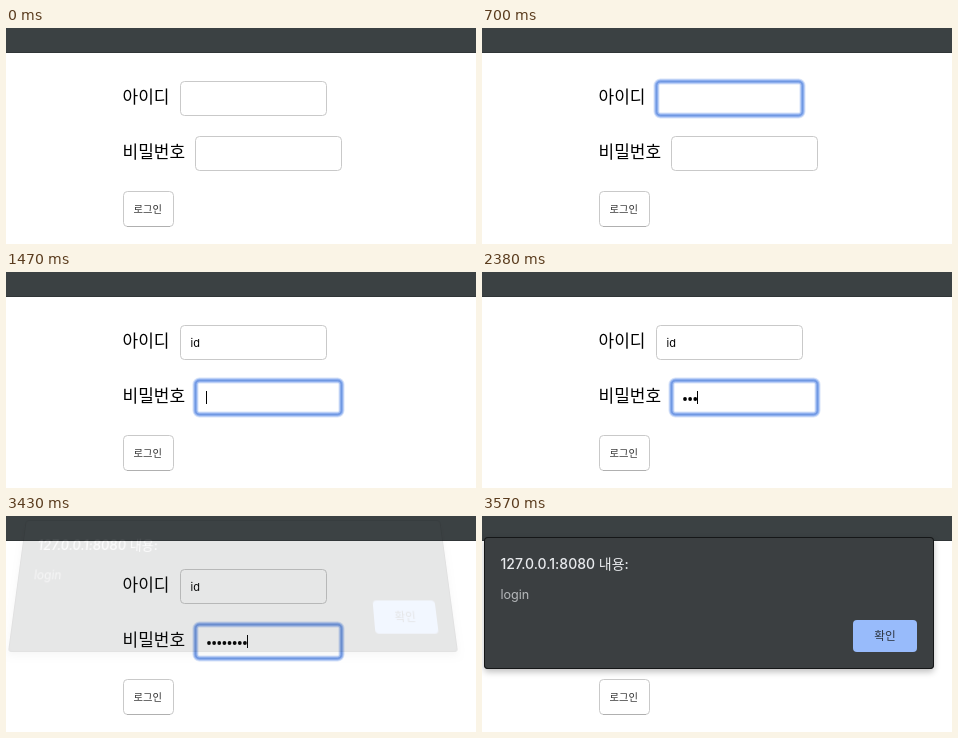
Write an HTML page that moves like this. It is 470 px wide and 216 px high and loops after 4830 ms.

```html
<!DOCTYPE html>
<html lang="ko">
<head>
<meta charset="utf-8">
<style>
html, body { margin: 0; width: 100%; height: 100%; overflow: hidden; background: #fff; }
svg { position: absolute; display: block; font-family: Inter, "Noto Sans CJK KR", "Noto Sans CJK JP", "Noto Sans CJK", sans-serif; }
#page { left: 0; top: 0; }
#dialog {
  left: 2px; top: 21px; border-radius: 4px; background: #3b3f41;
  transform-origin: 50% 100%;
  box-shadow: inset 0 0 0 1px #151718, 0 3px 6px rgba(0, 0, 0, .25);
}
.field, .button { fill: #fff; stroke: #c9c9c9; }
.label { font-size: 17px; }
#ring rect { fill: none; stroke: #5f8ee6; }
</style>
</head>
<body>
<svg id="page" width="470" height="216">
  <rect width="470" height="25" fill="#3b4143"/>
  <rect y="24" width="470" height="1" fill="#303537"/>
  <text class="label" x="116.5" y="75">아이디</text>
  <text class="label" x="116.5" y="130">비밀번호</text>
  <rect class="field" x="174.5" y="53.5" width="146" height="34" rx="4"/>
  <rect class="field" x="189.5" y="108.5" width="146" height="34" rx="4"/>
  <rect class="button" x="117.5" y="163.5" width="50" height="35" rx="4"/>
  <path d="M121 198.5H164" stroke="#b0b0b0"/>
  <text x="127.5" y="184.7" font-size="10.3" fill="#333">로그인</text>
  <g id="ring">
    <rect width="146" height="34" rx="4" stroke-width="6" opacity=".25"/>
    <rect width="146" height="34" rx="4" stroke-width="4" opacity=".45"/>
    <rect width="146" height="34" rx="4" stroke-width="2" opacity=".6"/>
  </g>
  <text id="user" x="184.5" y="75" font-size="11"></text>
  <g id="dots"></g>
  <rect id="caret" width="1" height="13"/>
</svg>
<svg id="dialog" width="450" height="132">
  <text x="16.5" y="32" font-size="14" font-weight="500" fill="#e8eaed">127.0.0.1:8080 내용:</text>
  <text x="16.5" y="62" font-size="12.6" fill="#b6b9bb">login</text>
  <rect x="369" y="83" width="64" height="32" rx="4" fill="#98bbfb"/>
  <text x="401" y="102.7" font-size="11.7" font-weight="500" fill="#2d3540" text-anchor="middle">확인</text>
</svg>
<script>
const LOOP = 4830;
const PITCH = 5.13;
const userKeys = [980, 1050];
const passwordKeys = [2030, 2100, 2380, 2520, 2800, 2870, 3010, 3080];
// start time, opacity, vertical shift, scale by which the top edge recedes
const dialogSteps = [[3430, .13, -17, 1.086], [3500, .63, -6, 1.026], [3570, 1, 0, 1]];

const [ring, user, dots, caret, dialog] =
  ['ring', 'user', 'dots', 'caret', 'dialog'].map(id => document.getElementById(id));
const show = (el, on) => el.style.visibility = on ? 'visible' : 'hidden';
const countUntil = (times, t) => times.filter(start => t >= start).length;

dots.innerHTML = passwordKeys.map((_, i) =>
  `<circle cx="${203 + i * PITCH}" cy="127" r="1.9"/>`).join('');

function drawForm(t) {
  const inPassword = t >= 1470;
  const letters = countUntil(userKeys, t);
  const typed = countUntil(passwordKeys, t);

  show(ring, t >= 140);
  ring.setAttribute('transform', inPassword ? 'translate(189.5 108.5)' : 'translate(174.5 53.5)');
  user.textContent = 'id'.slice(0, letters);
  [...dots.children].forEach((dot, i) => show(dot, i < typed));

  const blinkedOff = (t >= 700 && t < 980) || (t >= 1960 && t < 2030);
  show(caret, t >= 140 && !blinkedOff);
  caret.setAttribute('x', inPassword ? Math.round(200 + typed * PITCH) : [185, 188, 195][letters]);
  caret.setAttribute('y', inPassword ? 119 : 64);
}

function drawDialog(t) {
  const step = dialogSteps[countUntil(dialogSteps.map(s => s[0]), t) - 1];
  show(dialog, step);
  if (!step) return;
  const [, opacity, shift, depth] = step;
  const tilt = (1 - depth) / 132;
  dialog.style.opacity = opacity;
  dialog.style.transform =
    `translateY(${shift}px) matrix3d(1,0,0,0, 0,${depth},0,${tilt}, 0,0,1,0, 0,0,0,1)`;
}

function frame() {
  const t = performance.now() % LOOP;
  drawForm(t);
  drawDialog(t);
  requestAnimationFrame(frame);
}
frame();
</script>
</body>
</html>
```
